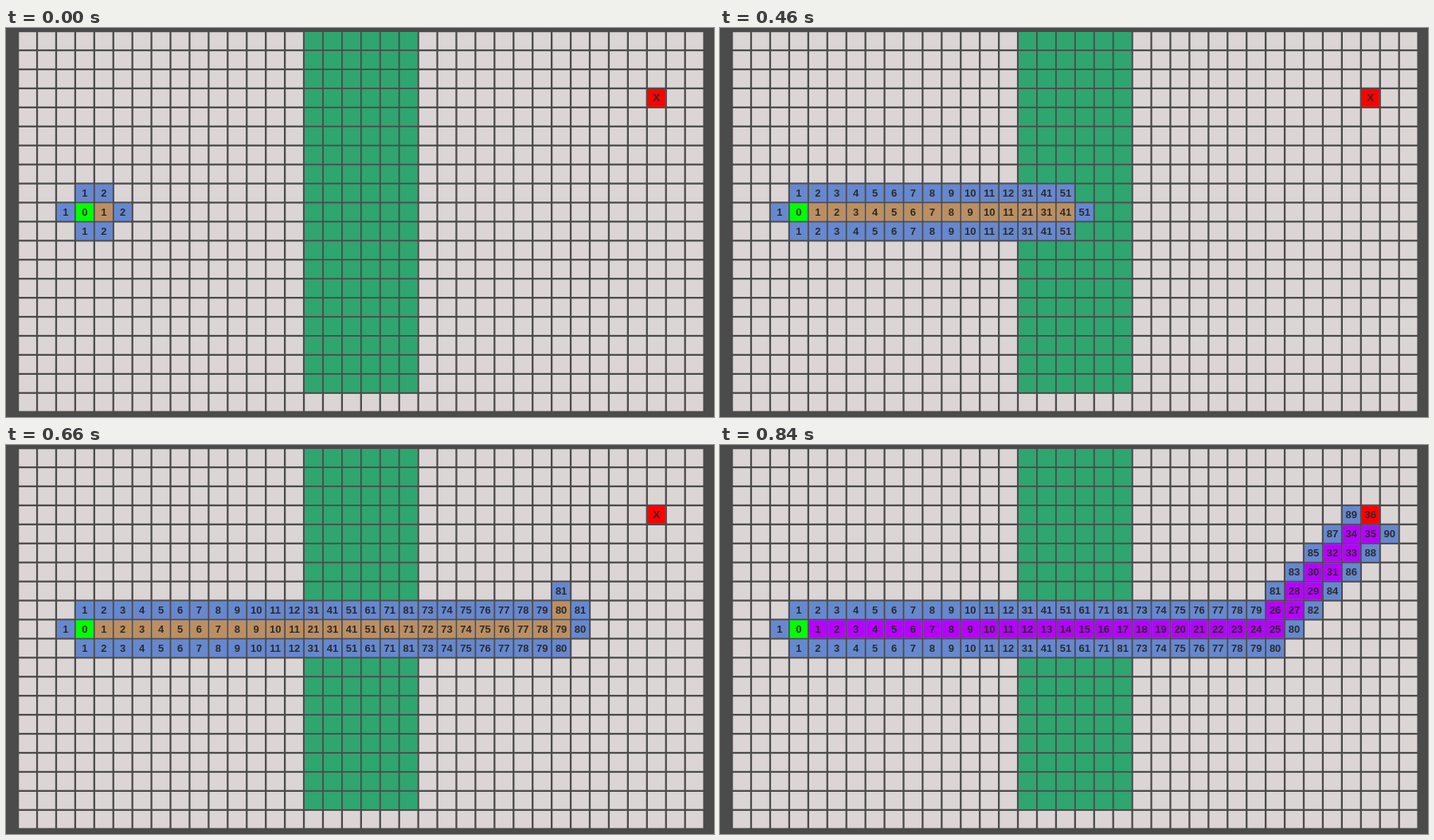
These frames come from a looping animation (889 px wide and 489 px high, 2.14 s). An HTML page with a canvas:

```html
<!DOCTYPE html>
<html lang="en">
<head>
<meta charset="utf-8">
<title>Grid path search</title>
<style>
  html, body { margin: 0; width: 100%; height: 100%; overflow: hidden; background: #4b4b4b; }
  canvas { display: block; width: 889px; height: 489px; }
</style>
</head>
<body>
<canvas id="stage" width="889" height="489"></canvas>
<script>
const ctx = document.getElementById('stage').getContext('2d');
const COLS = 36, ROWS = 20, PITCH = 23.93, LEFT = 15.1, TOP = 4.1;
const LOOP = 2140;
const COLOR = {
  back: '#4b4b4b', floor: '#dbd5d5', forest: '#2fa56f', open: '#6688cf',
  closed: '#bc8f61', path: '#b700ff', start: '#00ff00', goal: '#ff0000', text: '#2b2b2b'
};

// [time in ms, number of expanded cells after the start]
const STEPS = [
  [0, 1], [300, 3], [330, 5], [380, 8], [410, 11], [460, 14], [510, 17], [560, 20],
  [610, 23], [660, 26], [710, 29], [740, 31], [790, 33], [840, 36]
];

// Route: straight east, then a staircase north-east to the goal.
const route = [];
for (let x = 3; x <= 28; x++) route.push([x, 9]);
for (let i = 0; i < 11; i++) route.push([28 + Math.ceil(i / 2), 8 - Math.floor(i / 2)]);
const last = route.length - 1;
const goal = route[last];

const isForest = (x, y) => x >= 15 && x <= 20 && y < 19;
const stepCost = (x, y) => isForest(x, y) ? 10 : 1;
const key = (x, y) => y * COLS + x;

function cell(x, y, color, label) {
  const inset = color === COLOR.floor ? 1.15 : 0.9;
  const px = LEFT + x * PITCH, py = TOP + y * PITCH, size = PITCH - 2 * inset;
  ctx.fillStyle = color;
  ctx.fillRect(px + inset, py + inset, size, size);
  if (label === undefined) return;
  ctx.fillStyle = COLOR.text;
  ctx.fillText(label, px + PITCH / 2, py + PITCH / 2 + 4.6);
}

// Expand cells in order; each neighbour keeps its first cost.
function search(count) {
  const cost = new Map([[key(...route[0]), 0]]);
  for (let i = 0; i <= Math.min(count, last - 1); i++) {
    const [x, y] = route[i], base = cost.get(key(x, y));
    for (const [dx, dy] of [[1, 0], [0, -1], [-1, 0], [0, 1]]) {
      const k = key(x + dx, y + dy);
      if (!cost.has(k)) cost.set(k, base + stepCost(x + dx, y + dy));
    }
  }
  return cost;
}

function draw(count) {
  const done = count === last;
  ctx.fillStyle = COLOR.back;
  ctx.fillRect(0, 0, 889, 489);
  ctx.font = 'bold 13px "Liberation Sans", Arial, sans-serif';
  ctx.textAlign = 'center';
  const cost = search(count);
  for (let y = 0; y < ROWS; y++) {
    for (let x = 0; x < COLS; x++) {
      const k = key(x, y);
      if (cost.has(k)) cell(x, y, COLOR.open, cost.get(k));
      else cell(x, y, isForest(x, y) ? COLOR.forest : COLOR.floor);
    }
  }
  for (let i = 0; i <= Math.min(count, last - 1); i++) {
    const [x, y] = route[i];
    const color = i === 0 ? COLOR.start : done ? COLOR.path : COLOR.closed;
    cell(x, y, color, done ? i : cost.get(key(x, y)));
  }
  cell(...goal, COLOR.goal, done ? last : 'X');
}

const begin = performance.now();
let shown = -1;
function tick() {
  const t = (performance.now() - begin) % LOOP;
  const count = STEPS.filter(([at]) => at <= t).pop()[1];
  if (count !== shown) draw(shown = count);
  requestAnimationFrame(tick);
}
tick();
</script>
</body>
</html>
```
